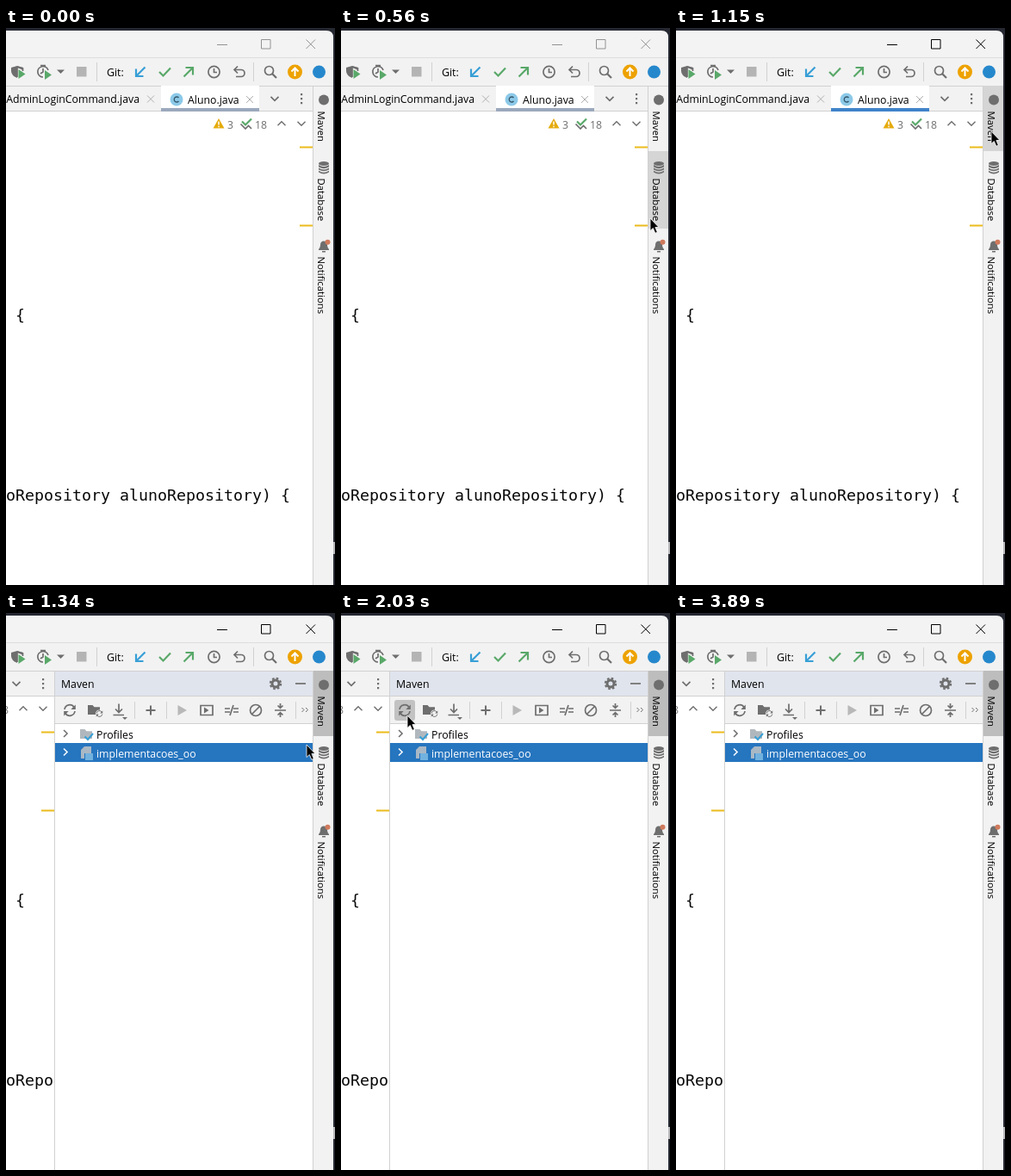
An HTML page that plays this animation: 382 px wide and 647 px high, repeating every 3.95 s.

```html
<!DOCTYPE html>
<html lang="en">
<head>
<meta charset="utf-8">
<title>IDE tool window</title>
<style>
  html, body { margin: 0; width: 100%; height: 100%; overflow: hidden; background: #252731; }
  svg { display: block; width: 382px; height: 647px; font: 12.3px "Open Sans", "Noto Sans", sans-serif; }
  text { white-space: pre; }
  .code { font: 18.27px "DejaVu Sans Mono", "Noto Sans Mono", monospace; fill: #080808; }
  .side { font-size: 11.3px; }
  .icon { fill: none; stroke: #6e6e6e; stroke-width: 1.7; }
  .solid { fill: #6e6e6e; stroke: none; }
  .line { fill: none; stroke: #d1d1d1; }
  .green { stroke: #59a869; stroke-width: 2.2; }
  .blue { stroke: #389fd6; stroke-width: 2.2; }
  .pale { stroke: #b0b0b0; stroke-width: 1; }
  .bar { fill: #f2f2f2; }
</style>
</head>
<body>
<svg viewBox="0 0 382 647">
  <defs>
    <path id="chevron" d="M-4.5 -2.2L0 2.3 4.5 -2.2"/>
    <path id="cross" d="M-4 -4L4 4M4 -4L-4 4"/>
    <path id="arrow" d="M5.5 -5.5L-5 5M-5 -3.5V5H3.5"/>
    <g id="reload">
      <path d="M-6 -1A6 6 0 0 1 5 -3.5M6 1A6 6 0 0 1 -5 3.5"/>
      <path class="solid" d="M6.8 -6.5V-1H1.3ZM-6.8 6.5V1H-1.3Z"/>
    </g>
    <path id="folder" d="M0 0H5.5L7.5 2.2H14V11H0Z"/>
    <g id="clock"><circle r="6.6"/><path d="M0 -4V.5H3.5"/></g>
  </defs>

  <path fill="#f3f3f3" d="M0 3H372Q380 3 380 11V647H0Z"/>
  <path fill="#b8b8bb" d="M380 597h2v14h-2z"/>
  <path class="bar" d="M0 35H380V67H0Z"/>
  <path class="line" stroke-opacity=".6" d="M0 34.5H380"/>

  <path id="buttons" fill="none" d="M245 19.5H257M296.500 13.500H307V24H296.500ZM348.500 13.500L359 24M359 13.500L348.500 24"/>

  <!-- main toolbar -->
  <path class="line" d="M105.500 40V62M287.500 40V62"/>
  <g class="icon">
    <path class="solid" d="M6 46L13 44 20 46V49L13 46V58Q6 55 6 50Z"/>
    <path d="M13 45L19.500 47V50M13 45V57"/>
    <path fill="#59a869" stroke="none" d="M14.500 48V59L22.500 53.500Z"/>
    <path d="M43 57A6.200 6.200 0 1 1 49 49M43 47V51L40 53M40 43.500H46"/>
    <path fill="#59a869" stroke="none" d="M45 49V60L53 54.500Z"/>
    <path class="solid" d="M59 48.500H68L63.500 53Z"/>
    <path fill="#b4b4b4" stroke="none" d="M82 45H93.500V56.500H82Z"/>
    <use href="#arrow" class="blue" x="156" y="51"/>
    <path class="green" d="M178 51L182.500 55.500 191 46.500"/>
    <use href="#arrow" class="green" transform="translate(212 51) rotate(180)"/>
    <use href="#clock" x="241.500" y="51"/>
    <path d="M269 44.500L265 48.500 269 52.500M265 48.500H273A3.800 3.800 0 0 1 273 56.500H267"/>
    <circle cx="305.500" cy="49.500" r="5"/>
    <path stroke-width="2.200" d="M309 53L314 58"/>
  </g>
  <text x="117" y="56">Git:</text>
  <circle cx="335.500" cy="51" r="8.500" fill="#eda200"/>
  <path fill="none" stroke="#fff" stroke-width="2" d="M335.500 56V47M331.500 50.500L335.500 46.500 339.500 50.500"/>
  <circle cx="363.500" cy="51" r="7.500" fill="#2688cc"/>

  <!-- editor -->
  <path class="bar" d="M0 67H357V97H0Z"/>
  <path fill="#fff" d="M0 97H357V647H0Z"/>
  <path class="line" d="M0 67.500H380M0 96.500H357"/>
  <text class="code" x="11" y="340">{</text>
  <text class="code" x="0" y="549">oRepository alunoRepository) {</text>
  <g id="editorRight">
    <text x="155" y="87" text-anchor="end">AdminLoginCommand.java</text>
    <path fill="#fff" d="M180 67H294V97H180Z"/>
    <path id="underline" d="M180 93H294V97H180Z"/>
    <circle cx="198" cy="83" r="7.500" fill="#8cc9e8"/>
    <path fill="none" stroke="#35566a" stroke-width="1.300" d="M200.500 81A3 3 0 1 0 200.500 85"/>
    <text x="211" y="88">Aluno.java</text>
    <g class="icon">
      <use href="#cross" class="pale" x="168" y="82.500"/>
      <use href="#cross" class="pale" x="283" y="83"/>
      <use href="#chevron" x="312" y="82"/>
      <use href="#chevron" stroke-width="1.400" x="343" y="111"/>
      <use href="#chevron" stroke-width="1.400" transform="translate(320 111) scale(1 -1)"/>
      <path class="green" d="M274 108.500L278 112.500 285 105.500"/>
      <path d="M272.500 111.500L278 117 281.500 113.500 285 117"/>
    </g>
    <path fill="#6e6e6e" d="M342 76h2.200v2.200H342zm0 5h2.200v2.200H342zm0 5h2.200v2.200H342z"/>
    <path fill="#e5ab0c" d="M247 105L253.500 116.500H240.500Z"/>
    <path stroke="#fff" stroke-width="1.500" d="M247 108.500V112.500M247 113.800V115.300"/>
    <g fill="#6e6e6e"><text x="257" y="117">3</text><text x="289" y="117">18</text></g>
    <path stroke="#ebbc1d" stroke-width="2" d="M341 138.500H356M341 229.500H356"/>
  </g>

  <!-- tool window -->
  <g id="panel">
    <path fill="#fff" d="M56 67H357V647H56Z"/>
    <path fill="#e0e4ed" d="M57 68H357V97H57Z"/>
    <path class="bar" d="M57 97H357V128H57Z"/>
    <path class="line" d="M56.500 67V647M57 67.500H357M57 96.500H357M57 128.500H357M149.500 103V123M186.500 103V123M336.500 103V123"/>
    <text x="64" y="87">Maven</text>
    <rect id="reloadHover" x="62" y="101" width="24" height="24" rx="3"/>
    <rect id="folderHover" x="91" y="101" width="24" height="24" rx="3" fill="#d9d9d9"/>
    <g class="icon">
      <circle cx="313" cy="82" r="4" stroke-width="3"/>
      <circle cx="313" cy="82" r="6.200" stroke-width="2" stroke-dasharray="2.600 2.270"/>
      <path d="M336 82H348"/>
      <use href="#reload" x="74" y="113"/>
      <use href="#folder" class="solid" x="95" y="107"/>
      <circle cx="108.500" cy="117" r="4.500" class="bar" stroke="none"/>
      <use href="#reload" transform="translate(108.500 117) scale(.55)"/>
      <path d="M131 105.500V115M127 111.500L131 115.500 135 111.500M124.500 118.500H137"/>
      <path class="solid" d="M135 121H141L138 124Z"/>
      <path stroke-width="2" d="M162.500 113H173.500M168 107.500V118.500"/>
      <path fill="#b8b8b8" stroke="none" d="M199.500 107V119L210 113Z"/>
      <path d="M226 107.500H240V118.500H226Z"/>
      <path class="solid" d="M230 109.500V116.500L235.500 113Z"/>
      <path d="M254 111H260M264 111H270M254 115H260M264 115H270M260 119L264 107"/>
      <circle cx="290" cy="113" r="6.500"/>
      <path d="M285.500 117.500L294.500 108.500"/>
      <path d="M312 113H325M318.500 105V110M315.500 107.500L318.500 110.300 321.500 107.500M318.500 121V116M315.500 118.500L318.500 115.700 321.500 118.500"/>
      <path stroke-width="1" d="M343.500 110L346 112.500 343.500 115M348 110L350.500 112.500 348 115"/>
      <use href="#chevron" transform="translate(69 140) rotate(-90) scale(.9)"/>
    </g>
    <use href="#folder" fill="#b1b8bd" x="86" y="135"/>
    <path fill="none" stroke="#389fd6" stroke-width="2" d="M91.500 143.500L95 147 101 140"/>
    <text x="105" y="146">Profiles</text>
    <path fill="#2675bf" d="M57 151H357V173H57Z"/>
    <use href="#chevron" fill="none" stroke="#fff" stroke-width="1.700" transform="translate(69 161.500) rotate(-90) scale(.9)"/>
    <path fill="#a9b8c5" d="M91 155H99V163H87V159Z"/>
    <path fill="#72b2df" d="M92 163h9v8h-9z"/>
    <path fill="#a9b8c5" d="M87 163h4v6h-4z"/>
    <text x="105" y="168" fill="#fff">implementacoes_oo</text>
  </g>

  <!-- right stripe -->
  <path class="bar" d="M357 68H380V647H357Z"/>
  <path id="mavenHover" d="M357 67H380V143H357Z"/>
  <path id="databaseHover" fill="#d5d5d5" d="M357 143H380V233H357Z"/>
  <path class="line" d="M356.500 67V647"/>
  <circle class="solid" cx="369" cy="83.500" r="6"/>
  <g class="solid">
    <ellipse cx="369" cy="157.500" rx="6" ry="2.500"/>
    <path d="M363 159Q369 163 375 159V161.300Q369 165 363 161.300ZM363 162.500Q369 166.500 375 162.500V164.500Q369 168 363 164.500ZM363 165.700Q369 169.700 375 165.700V167.500Q369 171.500 363 167.500Z"/>
    <path d="M363 257Q365 255 365 252Q365 247.500 369 247.500T373 252Q373 255 375 257V258H363ZM367 259H371V260.500H367Z"/>
  </g>
  <circle cx="373.500" cy="248.800" r="3" fill="#d07a5c"/>
  <g class="side">
    <text transform="translate(362 96.500) rotate(90)">Maven</text>
    <text transform="translate(362 174.500) rotate(90)">Database</text>
    <text transform="translate(362 265.500) rotate(90)">Notifications</text>
  </g>

  <path id="cursor" stroke="#fff" stroke-width=".8" d="M0 0V14.500L3.300 11.500 5.800 17.300 8.300 16.200 5.900 10.500H10Z"/>
</svg>
<script>
  const LOOP = 3950, STEP = 63.75, ENTER = 240, LEAVE = 3690;
  const ACTIVATE = 1150, OPEN = 1210, PRESS = 1980, RELEASE = 3180;

  // Pointer path: time, x, y
  const path = [
    [240, 375, 617], [304, 360, 520], [368, 348, 410], [431, 346, 320],
    [495, 351, 255], [558, 359, 221], [750, 365, 168], [880, 367, 137],
    [1010, 366, 120], [1200, 366, 120], [1340, 347, 157], [1460, 300, 150],
    [1580, 175, 137], [1650, 118, 128], [1706, 90, 121], [1780, 80, 119],
    [1850, 78, 120], [1980, 78, 120], [2025, 77, 119], [3150, 77, 119],
    [3172, 78, 120], [3236, 84, 135], [3300, 105, 180], [3364, 140, 250],
    [3428, 190, 340], [3492, 245, 430], [3556, 300, 520], [3618, 349, 625]
  ];

  const el = id => document.getElementById(id);
  const show = (id, on) => el(id).setAttribute('visibility', on ? 'inherit' : 'hidden');

  function pointerAt(time) {
    const t = ENTER + Math.floor((time - ENTER) / STEP) * STEP;
    const i = path.findIndex(p => p[0] > t);
    if (i < 1) return path[i < 0 ? path.length - 1 : 0].slice(1);
    const a = path[i - 1], b = path[i], k = (t - a[0]) / (b[0] - a[0]);
    return [1, 2].map(n => Math.round(a[n] + (b[n] - a[n]) * k));
  }

  function draw(now) {
    const t = now % LOOP;
    const active = t >= ACTIVATE, open = t >= OPEN;
    const visible = t >= ENTER && t < LEAVE;
    const [x, y] = pointerAt(t);
    const over = (x0, y0, x1, y1) => visible && x >= x0 && x < x1 && y >= y0 && y < y1;

    el('cursor').setAttribute('transform', `translate(${x} ${y})`);
    show('cursor', visible);
    el('buttons').setAttribute('stroke', active ? '#000' : '#929292');
    el('underline').setAttribute('fill', active ? '#4083c9' : '#9ca9bd');
    el('editorRight').setAttribute('transform', `translate(${open ? -300 : 0} 0)`);
    show('panel', open);
    show('mavenHover', open || over(357, 67, 380, 143));
    el('mavenHover').setAttribute('fill', open ? '#bdbdbd' : '#d5d5d5');
    show('databaseHover', over(357, 143, 380, 233));
    show('reloadHover', open && over(62, 101, 87, 126));
    el('reloadHover').setAttribute('fill', t >= PRESS && t < RELEASE ? '#c2c2c2' : '#d9d9d9');
    show('folderHover', open && over(90, 101, 116, 126));
  }

  const start = performance.now();
  function tick() {
    draw(performance.now() - start);
    requestAnimationFrame(tick);
  }
  tick();
</script>
</body>
</html>
```
